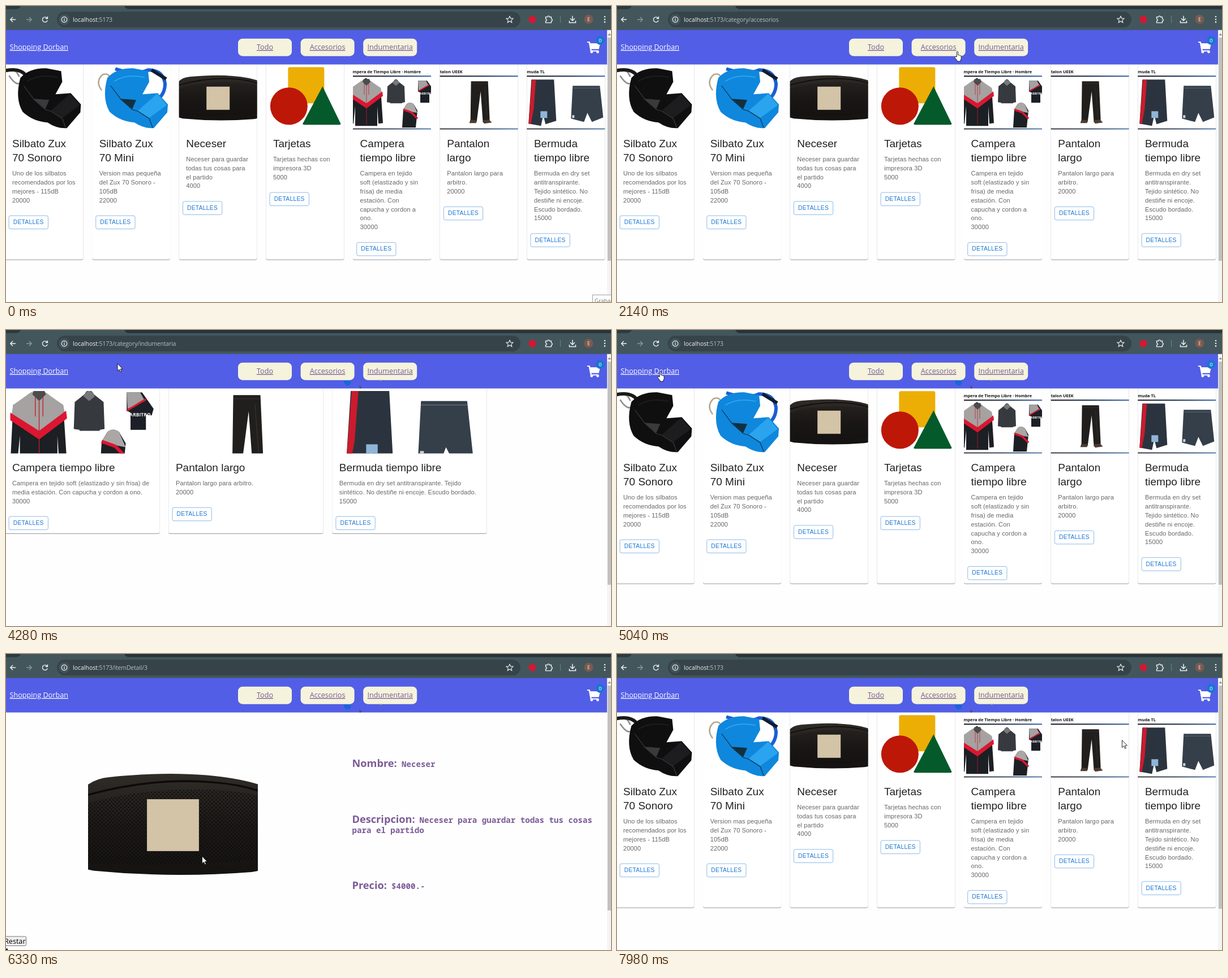
Write an HTML page that moves like this. It is 1069 px wide and 524 px high and loops after 8000 ms.

```html
<!DOCTYPE html>
<html lang="es">
<head>
<meta charset="utf-8">
<title>Tienda</title>
<style>
html, body { margin: 0; width: 100%; height: 100%; overflow: hidden; background: #fefefe; }
svg { display: block; }
#stage { position: absolute; left: 0; top: 0; }
text { white-space: pre; }
.ui { font: 12.64px "Open Sans", "Noto Sans", sans-serif; }
.url { font: 10.5px "Open Sans", "Noto Sans", sans-serif; }
#path { letter-spacing: -.18px; }
.link { fill: #765899; text-decoration: underline; text-anchor: middle; }
.title { font: 19px "Liberation Sans", Arial, sans-serif; fill: #212121; }
.body { font: 11.06px "Liberation Sans", Arial, sans-serif; letter-spacing: .118px; fill: #666; }
.btn { font: 10.27px "Liberation Sans", Arial, sans-serif; letter-spacing: .293px; fill: #1976d2; }
.head { font: bold 7.4px "Open Sans", "Noto Sans", sans-serif; fill: #111; }
.card { fill: #fff; filter: drop-shadow(0 1px .7px rgba(0,0,0,.4)); }
.label { font: bold 18.2px "Open Sans", "Noto Sans", sans-serif; fill: #7b5b98; }
.value { font: bold 14.15px "Noto Sans Mono", "DejaVu Sans Mono", monospace; fill: #7b5b98; }
</style>
</head>
<body>
<svg id="stage" width="1069" height="524" viewBox="0 0 1069 524">
  <defs>
    <linearGradient id="rule"><stop stop-color="#111"/><stop offset=".5" stop-color="#1c2c44"/><stop offset="1" stop-color="#3f74bd"/></linearGradient>
    <linearGradient id="cloth" x2="0" y2="1"><stop stop-color="#302c28"/><stop offset=".5" stop-color="#1d1a18"/><stop offset="1" stop-color="#151312"/></linearGradient>
    <pattern id="mesh" width="3" height="3" patternUnits="userSpaceOnUse"><circle cx="1" cy="1" r=".6" fill="#0b0a09"/><circle cx="2.5" cy="2.5" r=".6" fill="#0b0a09"/></pattern>
  </defs>
  <rect width="1069" height="524" fill="#fefefe"/>
  <g id="pages"></g>

  <g id="nav">
    <rect y="42" width="1062" height="61.5" fill="#525ee6"/>
    <text class="ui" x="6.5" y="77" fill="#fff" text-decoration="underline">Shopping Dorban</text>
    <g id="links"></g>
    <path d="M1027 63h4.5l1 3h17.5l-2.4 10.2h-13.4l.5 2.4h12.3v1.9h-14.3l-3-15.4h-2.7z" fill="#fff"/>
    <circle cx="1034.8" cy="81.3" r="2.4" fill="#fff"/><circle cx="1045.5" cy="81.3" r="2.4" fill="#fff"/>
    <circle cx="1050" cy="61" r="7.8" fill="#1976d2"/>
    <text x="1050" y="64.4" fill="#fff" text-anchor="middle" style="font:9.5px 'Liberation Sans',Arial,sans-serif">0</text>
    <path id="smudgeA" d="M597 90h12l1 3-3 5h-6l-4-5z" fill="#1668d8"/>
    <g id="smudgeB"><path d="M624 98l5 4-4 2z" fill="#4c5068"/><path d="M658 88h9l-5 2z" fill="#cfc06a"/></g>
  </g>

  <rect x="1062" y="42" width="7" height="482" fill="#f4f4f4"/>
  <path d="M1063.5 52l2.7-3.6 2.8 3.6z" fill="#8a8a8a"/>
  <rect id="thumb" x="1063" y="56" width="6" height="395" fill="#c1c1c1"/>

  <g id="chrome">
    <rect width="1069" height="42.5" fill="#43565c"/>
    <path d="M209 0H1069V5.5H217Q211 5 209 0z" fill="#263439"/>
    <path d="M0 0H26Q24 5 18 5.5H0z" fill="#2b3a3f"/>
    <rect x="90" y="10" width="819" height="28" rx="14" fill="#36444a"/>
    <circle cx="103" cy="24" r="9.5" fill="#43545b"/>
    <g fill="none" stroke="#eef2f3" stroke-width="1.4">
      <path d="M17 24H8M12 19.8L7.8 24l4.2 4.2"/>
      <path d="M36 24h9M41 19.8l4.2 4.2-4.2 4.2" stroke="#8a999e"/>
      <path d="M72.6 21.5a4.5 4.5 0 1 0 .6 4M73.4 18.6v3.6h-3.6"/>
      <circle cx="103" cy="24" r="4.8" stroke-width="1.2"/><path d="M103 23.2v3.4M103 21v1.2"/>
      <path d="M890 18l1.8 3.9 4.2.4-3.2 2.8 1 4.2-3.8-2.3-3.8 2.3 1-4.2-3.2-2.8 4.2-.4z" stroke-width="1.1"/>
      <path d="M953.5 19.5h3.2a1.8 1.8 0 0 1 3.6 0h3.2v3.3a1.9 1.9 0 0 1 0 3.8v3h-10v-3a1.9 1.9 0 0 0 0-3.8z" stroke-width="1.3"/>
      <path d="M1001 17.5v8M997 22l4 4 4-4M995.5 26v3.5h11V26" stroke-width="1.5"/>
    </g>
    <circle cx="930" cy="24" r="6.2" fill="#e0122f"/>
    <path d="M979.5 17v13" stroke="#6e8087"/>
    <circle cx="1029.5" cy="23.5" r="8" fill="#7a5a50"/>
    <text x="1029.5" y="26.8" fill="#f3e9e5" text-anchor="middle" style="font:9px 'Open Sans',sans-serif">E</text>
    <g fill="#eef2f3"><circle cx="1058" cy="19" r="1.3"/><circle cx="1058" cy="23.7" r="1.3"/><circle cx="1058" cy="28.4" r="1.3"/></g>
    <text class="url" x="118" y="27.6" fill="#f1f4f5">localhost<tspan id="path" fill="#b4bfc3"></tspan></text>
  </g>

  <g id="tip">
    <rect x="1036.5" y="511.5" width="40" height="20" fill="#fff" stroke="#a0a0a0"/>
    <text x="1040" y="525.5" fill="#777" style="font:10px 'Open Sans',sans-serif">Grabar</text>
  </g>
  <path id="arrow" d="M.5.5v13l3-2.8 2 4.6 2-.9-2-4.400h4z" fill="#fff" stroke="#111" stroke-width=".9"/>
  <path id="hand" d="M4.2 10V1.8q0-1.300 1.200-1.300t1.200 1.300v5q1.200-.7 2 .5 1.200-.5 1.900.6 1.700-.4 1.700 1.300v4.200l-1.500 3.400v1.200H5.200v-1.200L.9 11.300Q.2 9.800 1.700 9.500z" fill="#fff" stroke="#111" stroke-width=".9"/>
</svg>
<script>
const $ = id => document.getElementById(id);
const show = (id, on) => $(id).style.display = on ? '' : 'none';
const shape = (d, fill, extra = '') => `<path d="${d}" fill="${fill}" ${extra}/>`;
const line = (d, stroke, w) => shape(d, 'none', `stroke="${stroke}" stroke-width="${w}"`);
const text = (cls, x, y, s, extra = '') => `<text class="${cls}" x="${x}" y="${y}" ${extra}>${s}</text>`;

// Product pictures, drawn around their centre.
const whistle = (base, dark, lite) =>
  shape('M-42-36Q-26-54 4-53L30-48 32-29 20-7 47-9 65 11 64 25 40 53Q22 54 6 43-20 41-38 24-52 0-42-36z', base) +
  shape('M12 22L46-8 63 12 32 35z', lite) +
  shape('M-19 1L9 3 2 19z', dark) +
  line('M-36-22L-18 2 2 20 12 23 32 36 38 52', dark, 1.2) +
  line('M-30-30Q-8-44 24-37', lite, 2);
const heading = (s, x, anchor) =>
  text('head', x, -44.5, s, `text-anchor="${anchor}"`) +
  '<rect x="-85" y="-40" width="170" height="2" fill="url(#rule)"/><rect x="-85" y="53.5" width="170" height="2" fill="url(#rule)"/>';

const art = {
  black: line('M-66-50Q-50-54-44-38M-62-40Q-48-18-38-30', '#8d8d8d', 2.5) + line('M-68-49Q-42-54-32-40', '#1a1a1a', 6) +
    whistle('#0f0f10', '#3a3a3d', '#1d1d20'),
  blue: line('M-28-52Q10-40 30-50 56-50 60-26 60-6 44 4', '#1a5fd0', 6) + line('M-52-14Q-64-30-50-42-36-46-38-30', '#b4a58c', 2.5) +
    whistle('#0f87dd', '#12303f', '#2aa4ee') + line('M36-50L62-34', '#101c30', 6),
  pouch: shape('M-80-10Q-74-36-50-38 10-44 52-36 82-30 82-22L78 28Q74 36 62 37 0 42-62 36-76 34-78 26z', 'url(#cloth)') +
    shape('M-78-14Q-30-30 30-28 70-26 80-18V24Q40 34-74 30z', 'url(#mesh)') +
    line('M-74-22Q-20-38 30-34 60-32 80-22', '#0c0b0a', 1.5) +
    '<rect x="-20.5" y="-20.5" width="41" height="41" fill="#d3c3a7"/>',
  cards: '<rect x="-30" y="-55" width="64" height="64" rx="3" fill="#ecae05"/><circle cx="-28.5" cy="14" r="33" fill="#bd1708"/>' +
    shape('M31-21L63 45Q63 47 61 47H-2Q-4 47-4 45z', '#045a2b'),
  jacket: heading('Campera de Tiempo Libre · Hombre', 51, 'end') +
    shape('M-75 44L-72-18-56-28-46-36-36-28-20-18-16 44-24 45-26 14V49H-65V14L-68 45z', '#1c1f24') +
    shape('M-72-18L-58-28Q-46-38-34-28L-20-18-18-8-45 12-74-6z', '#a5a2a1') +
    shape('M-75-10L-45 9-17-12-16-4-45 18-75-2z', '#dc1630') + shape('M-52-29L-45-22-38-29-40-34H-50z', '#4c4b4d') +
    line('M-49-27V-6M-41-27V-6M-45-22V47', '#c21d31', .8) +
    shape('M-9 7L-8-21 2-29Q7-38 12-29L22-21 23 7 18 8V9H-3V8z', '#363a3f') + shape('M1-27Q7-38 13-27L7-22z', '#77787b') +
    shape('M46-31H62L74-14 72-7 66-8V8H50V-10L46-12z', '#1c2026') + shape('M46-31L60-31 65-22 47-14z', '#a3a1a1') +
    line('M46-12L66-24', '#dc1630', 2) + text('head', 49, -6, 'ARBITRO', 'style="font-size:5px;fill:#eee"') +
    shape('M20 20L26 10Q32 6 38 10L45 22 42 52H18z', '#1c1f24') + shape('M20 20L26 10Q32 5 38 10L45 26 34 24z', '#aaa7a6') +
    line('M20 20L34 25 45 36', '#dc1630', 3.5),
  pants: heading('talon UEEK', -69, 'start') +
    shape('M-14-30H16L19 38 17 43H7L3-12-4 42H-15z', '#211f1e') + line('M-13-26H15M10-20L14 34', '#35312f', .8) +
    shape('M-15 38L-4 39-5 44H-17zM7 39L18 38 23 43 9 45z', '#4b3c32'),
  shorts: heading('muda TL', -69, 'start') +
    shape('M-61-33H-21L-17 40-36 46-40 30-44 49-66 45z', '#2b343e') + shape('M-60-33H-53L-57 20-62 46-66 45z', '#cc1b2d') +
    '<rect x="-45" y="23" width="12" height="12" fill="#8fb4d8"/>' +
    shape('M12-22H60L66 34 46 42 38 26 32 42 9 36z', '#343f4a') + line('M12-18H60', '#505b66', 1.5) +
    '<rect x="11" y="30" width="4" height="5" fill="#c9d3de"/>'
};

// art, scale in wide cards, title and description for narrow cards, then for wide ones
const goods = [
  ['black', 1.83, 'Silbato Zux|70 Sonoro', 'Uno de los silbatos|recomendados por los|mejores - 115dB|20000', 'Uno de los silbatos recomendados por los|mejores - 115dB|20000'],
  ['blue', 1.83, 'Silbato Zux|70 Mini', 'Version mas pequeña|del Zux 70 Sonoro -|105dB|22000', 'Version mas pequeña del Zux 70 Sonoro -|105dB|22000'],
  ['pouch', 1.34, 'Neceser', 'Neceser para guardar|todas tus cosas para|el partido|4000', 'Neceser para guardar todas tus cosas para|el partido|4000'],
  ['cards', 1.83, 'Tarjetas', 'Tarjetas hechas con|impresora 3D|5000', 'Tarjetas hechas con impresora 3D|5000'],
  ['jacket', 1.7, 'Campera|tiempo libre', 'Campera en tejido|soft (elastizado y sin|frisa) de media|estación. Con|capucha y cordon a|ono.|30000', 'Campera en tejido soft (elastizado y sin frisa) de|media estación. Con capucha y cordon a ono.|30000'],
  ['pants', 1.6, 'Pantalon|largo', 'Pantalon largo para|arbitro.|20000', 'Pantalon largo para arbitro.|20000'],
  ['shorts', 1.7, 'Bermuda|tiempo libre', 'Bermuda en dry set|antitranspirante.|Tejido sintético. No|destiñe ni encoje.|Escudo bordado.|15000', 'Bermuda en dry set antitranspirante. Tejido|sintético. No destiñe ni encoje. Escudo bordado.|15000']
];

function picture(name, x, y, w, h, scale) {
  return `<svg x="${x}" y="${y}" width="${w}" height="${h}"><g transform="translate(${w / 2} ${h / 2}) scale(${scale})">${art[name]}</g></svg>`;
}

function card([name, scale, title, narrow, broad], x, w, bottom, wide) {
  const heads = wide ? [title.replace('|', ' ')] : title.split('|');
  const lines = (wide ? broad : narrow).split('|');
  const y0 = 249.7 + heads.length * 25.3;
  const by = y0 + (lines.length - 1) * 15.8 + 23;
  return `<rect class="card" x="${x}" y="100" width="${w}" height="${bottom - 100}" rx="3.2"/>` +
    picture(name, x, 108, w, 110.5, wide ? scale : 1) +
    heads.map((s, i) => text('title', x + 12.6, 250 + i * 25.3, s)).join('') +
    lines.map((s, i) => text('body', x + 12.6, y0 + i * 15.8, s)).join('') +
    `<rect x="${x + 6.7}" y="${by + .5}" width="69.3" height="23.5" rx="3" fill="none" stroke="#8cbae8"/>` +
    text('btn', x + 14.3, by + 15.2, 'DETALLES');
}
const shelf = (list, pitch, w, bottom, wide) =>
  list.map((g, i) => card(g, -1.6 + i * pitch, w, bottom, wide)).join('');

const pages = {
  all: shelf(goods, 153.65, 138, 448.7, false),
  acc: shelf(goods.slice(0, 4), 268.9, 253.3, 360, true),
  ind: shelf(goods.slice(4), 288.9, 273.3, 360, true),
  detail: picture('pouch', 145, 153, 300, 300, 2.24) +
    text('label', 611.5, 200, 'Nombre:') + text('value', 699, 200, 'Neceser') +
    text('label', 611.5, 299, 'Descripcion:') + text('value', 730.5, 299, 'Neceser para guardar todas tus cosas') +
    text('value', 611.5, 316.5, 'para el partido') +
    text('label', 611.5, 415.5, 'Precio:') + text('value', 681, 415.5, '$4000.-') +
    '<rect x="-4" y="500" width="39.5" height="16.5" rx="2" fill="#efefef" stroke="#767676"/>' +
    text('ui', -3, 513, 'Restar') + '<rect y="521.5" width="3" height="3" fill="#111"/>'
};
$('pages').innerHTML = Object.entries(pages).map(([id, s]) => `<g id="${id}">${s}</g>`).join('');
$('links').innerHTML = ['Todo', 'Accesorios', 'Indumentaria'].map((s, i) =>
  `<rect x="${410 + i * 110.6}" y="57.7" width="95" height="31" rx="8" fill="#f5f3dc"/>` +
  text('ui link', 457.5 + i * 110.6, 77, s)).join('');

const LOOP = 8000, LOAD = 140;
// clicks: time, address, page that appears once loaded
const clicks = [[-LOAD, ':5173', 'all'], [2140, ':5173/category/accesorios', 'acc'],
  [2870, ':5173/category/indumentaria', 'ind'], [4890, ':5173', 'all'],
  [5850, ':5173/itemDetail/3', 'detail'], [7640, ':5173', 'all']];
// pointer track: time, x, y
const track = [[0, 1060, 540], [70, 1040, 516], [300, 651, 207], [370, 640, 196], [1180, 468, 78], [1260, 468, 78],
  [1450, 557, 79], [1950, 557, 79], [2140, 596, 80], [2210, 596, 80], [2740, 655, 71], [2935, 655, 71],
  [3240, 625, 97], [3550, 579, 78], [3950, 579, 78], [4280, 197, 59], [4750, 71, 73], [5040, 71, 73],
  [5760, 346, 357.5], [6400, 346, 357.5], [6530, 332, 354], [7430, 58, 74], [7700, 58, 74], [7980, 891, 152], [8100, 960, 160]];

const latest = t => clicks.filter(c => c[0] <= t).pop();

// Smooth speed through the track that never overshoots a point and stops at rests.
const slope = (i, k) => (track[i + 1][k] - track[i][k]) / (track[i + 1][0] - track[i][0]);
function speed(i, k) {
  if (i === 0 || i === track.length - 1) return 0;
  const a = slope(i - 1, k), b = slope(i, k);
  return a * b > 0 ? 2 * a * b / (a + b) : 0;
}
function pointer(t) {
  const i = track.findIndex(p => p[0] > t) - 1;
  const a = track[i], b = track[i + 1], d = b[0] - a[0], u = (t - a[0]) / d, v = 1 - u;
  return [1, 2].map(k =>
    a[k] * v * v * (1 + 2 * u) + b[k] * u * u * (3 - 2 * u) +
    d * u * v * (speed(i, k) * v - speed(i + 1, k) * u));
}

function overLink(x, y, view) {
  if (y > 56 && y < 89) {
    const u = x + 4 - 410;
    if (u >= 0 && u < 317 && u % 110.6 < 95) return true;
    return x < 107 && y > 63 && y < 83;
  }
  return view === 'all' && x > 308 && x < 380 && y > 344 && y < 369;
}

function draw(t) {
  const view = latest(t - LOAD)[2];
  for (const id in pages) show(id, id === view);
  $('path').textContent = latest(t)[1];
  $('thumb').setAttribute('height', view === 'detail' ? 398 : 395);
  show('tip', t < 70);
  show('smudgeA', t >= 2280);
  show('smudgeB', t >= 3300);
  const [x, y] = pointer(t), hand = overLink(x, y, view);
  show('hand', hand);
  show('arrow', !hand && t >= 70);
  $(hand ? 'hand' : 'arrow').setAttribute('transform', `translate(${x} ${y})`);
}

function tick() {
  draw(performance.now() % LOOP);
  requestAnimationFrame(tick);
}
tick();
</script>
</body>
</html>
```
